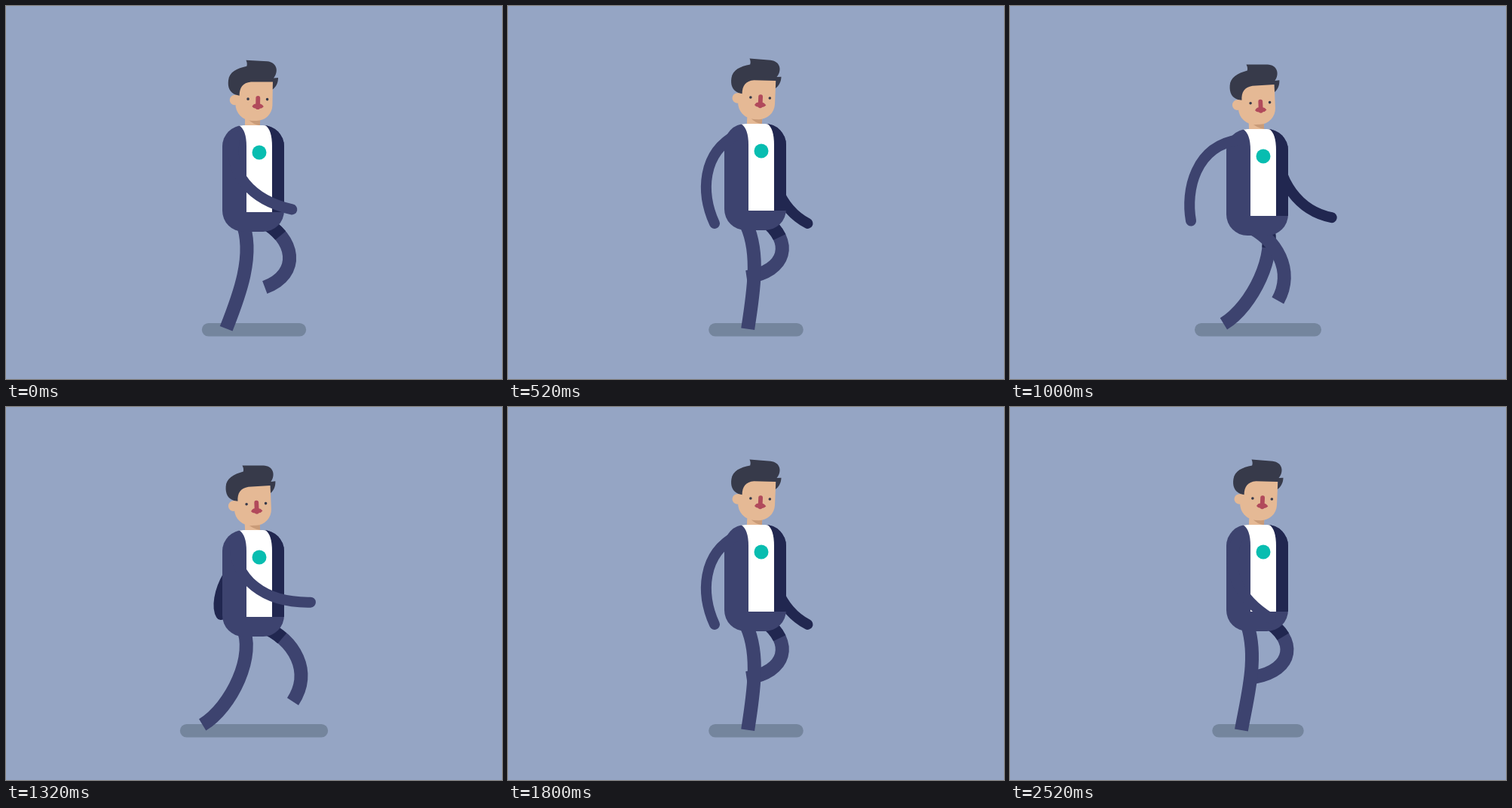
An HTML page with a canvas for the animation above (2.56 s loop, 658 by 494 pixels).

```html
<!DOCTYPE html>
<html>
<head>
<meta charset="utf-8">
<style>
html, body { margin: 0; width: 100%; height: 100%; overflow: hidden; background: #95a5c4; }
canvas { display: block; }
</style>
</head>
<body>
<canvas id="stage" width="658" height="494"></canvas>
<script>
const ctx = document.getElementById('stage').getContext('2d');
const CYCLE = 640, FRAME = 40, TAU = Math.PI * 2;
const SUIT = '#3d436f', SHADE = '#212750', SKIN = '#e5b995', HAIR = '#373a4a', RED = '#b14a5b';

// Cosine over one walk cycle with its crest at the given time
const wave = (t, crest) => Math.cos(TAU * (t - crest) / CYCLE);

// Curve from hip to foot; depth moves the leg towards the far side
function leg(t, depth) {
  const stride = wave(t, 95);
  const lift = Math.max(0, wave(t, 243));
  const bend = wave(t, 300);
  const shin = (44 + 36 * Math.tanh(3 * wave(t, 185))) * Math.PI / 180;
  const base = 8 + 20 * stride ** 2;
  const kneeShift = depth * (base + 16 * lift);
  const footX = 308 - 75 * stride ** 3;
  const footY = 428 - 75 * lift - 18 * stride ** 6;
  return [
    343.5 + 13 * bend + kneeShift, 318 - 11 * bend,
    footX + 45 * Math.sin(shin) + kneeShift, footY - 45 * Math.cos(shin),
    footX + depth * (base + 6 * lift), footY
  ];
}

// Curve from shoulder to hand, swinging forward and back
function arm(t, depth) {
  const s = wave(t, 94);
  return [
    273 + 32 * s + depth * 52, 207 + 25 * s + depth * 4,
    288 + 64 * s + depth * 41, 252 + 9 * s + depth * 12,
    322 + 95 * s + depth * (34 - 13 * s), 285 - 15 * s - 18 * s * s + depth * (6 + 18 * s)
  ];
}

function limb(x, y, points, color, width, cap, dash = []) {
  ctx.beginPath();
  ctx.moveTo(x, y);
  ctx.bezierCurveTo(...points);
  ctx.strokeStyle = color;
  ctx.lineWidth = width;
  ctx.lineCap = cap;
  ctx.setLineDash(dash);
  ctx.stroke();
}

function fill(color, path) {
  ctx.fillStyle = color;
  ctx.fill(new Path2D(path));
}

function pill(color, x, y, w, h, r) {
  ctx.fillStyle = color;
  ctx.beginPath();
  ctx.roundRect(x, y, w, h, r);
  ctx.fill();
}

function dot(color, x, y, r) {
  pill(color, x - r, y - r, 2 * r, 2 * r, r);
}

function drawGround(t) {
  const width = 101 + 150 * wave(t, 95) ** 4 + 20 * wave(t, 600);
  pill('#74859d', 329 - width / 2, 420, width, 17.5, 8.75);
}

function drawBody() {
  ctx.save();
  ctx.beginPath();
  ctx.roundRect(287, 158, 82, 141, 28);
  ctx.clip();
  fill(SUIT, 'M287 158H369V299H287Z');
  fill(SHADE, 'M340 158H369V273H340Z');
  fill('#fff', 'M309 158Q319 164 319 186V273H353V186Q353 164 344 158Z');
  ctx.restore();
  dot('#08bdb0', 336, 194, 9.5);
}

function drawHead() {
  pill(SKIN, 317, 140, 20, 20, 0);
  fill('#c99b78', 'M321 150H337V158Q328 157 321 150Z');
  dot(SKIN, 303, 125, 6.8);
  pill(SKIN, 304, 92, 49, 60, [0, 0, 21, 22]);
  fill(HAIR, 'M317 72L345 73C358 74 361 86 354 95L360 94.5C360 102 357 107 353 110V100L324 100.5C313 102 309 108 309 119L304 118C296 115 293 108 294 99C295 88 305 83 318 80C319 77 318 74 317 72Z');
  dot(HAIR, 320.5, 123.3, 1.8);
  dot(HAIR, 346, 123.3, 1.8);
  pill(RED, 330.8, 119, 5.8, 18, 2.9);
  fill(RED, 'M326 133Q329 128 333.7 130Q338 128 341.4 133Q338 137 333.7 135Q329 137 326 133Z');
}

function draw(t) {
  const beat = TAU * (t - 80) / 320;
  const bob = 1.5 + 5 * Math.cos(beat) + 1.5 * Math.cos(2 * beat);
  const half = t + CYCLE / 2;

  ctx.fillStyle = '#95a5c4';
  ctx.fillRect(0, 0, 658, 494);
  drawGround(t);
  limb(355, 175 + bob, arm(half, 1), SHADE, 14, 'round');

  const farLeg = leg(half, 1);
  limb(340, 285 + bob, farLeg, SUIT, 18, 'butt');
  limb(340, 285 + bob, farLeg, SHADE, 18, 'butt', [31, 999]);
  limb(313, 285 + bob, leg(t, 0), SUIT, 18, 'butt');

  ctx.save();
  ctx.translate(328, 156 + bob);
  ctx.rotate((1 - 0.68 * bob) * Math.PI / 180);
  ctx.translate(-328, -156);
  drawHead();
  ctx.restore();

  ctx.save();
  ctx.translate(0, bob);
  drawBody();
  ctx.restore();
  limb(304, 172 + bob, arm(t, 0), SUIT, 14, 'round');
}

function tick() {
  draw(Math.floor(performance.now() / FRAME) * FRAME % CYCLE);
  requestAnimationFrame(tick);
}
tick();
</script>
</body>
</html>
```
